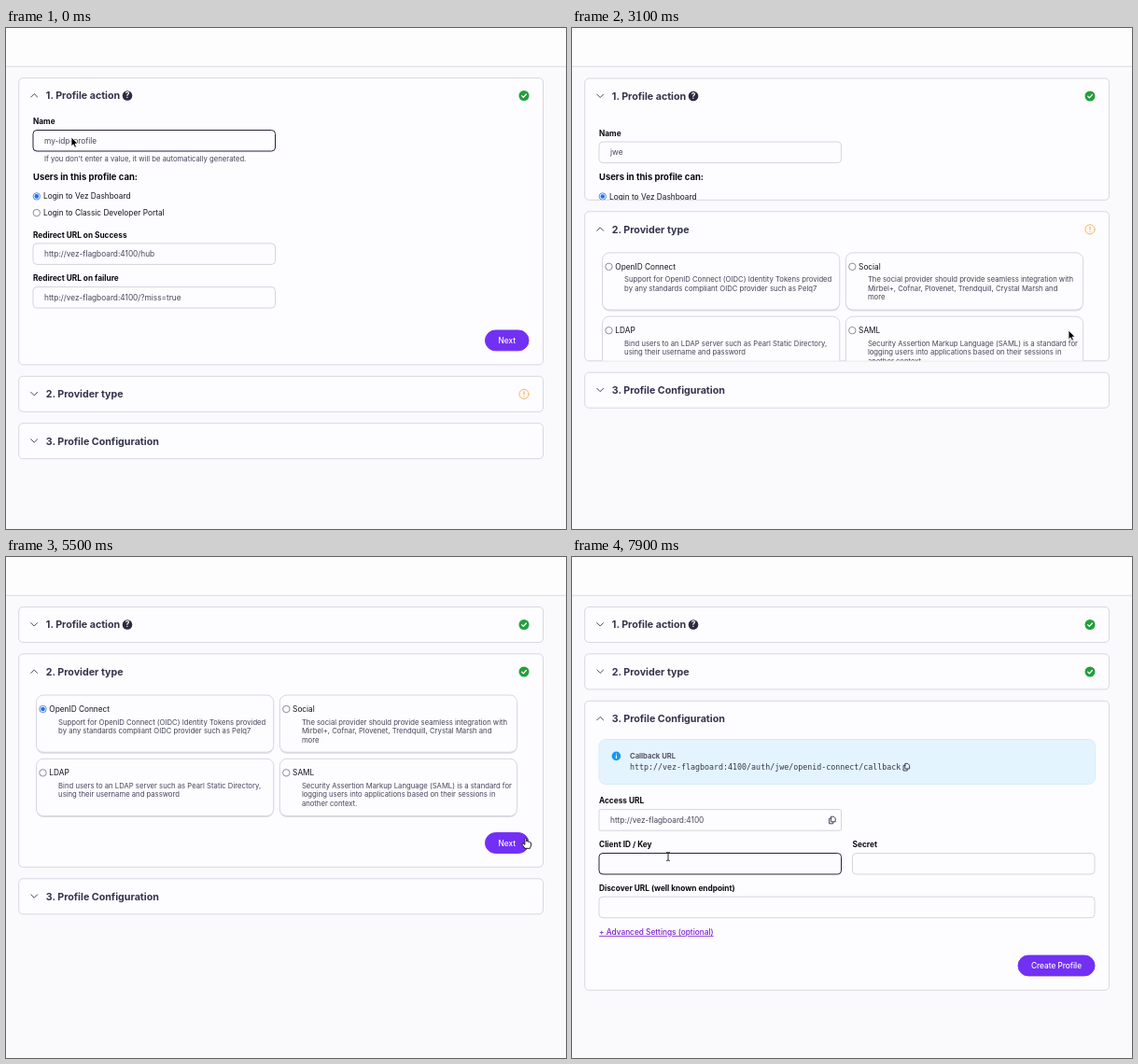
These frames come from a looping animation (600x537 px, 8000 ms). An HTML page:

```html
<!DOCTYPE html>
<html lang="en">
<head>
<meta charset="utf-8">
<title>Profile wizard</title>
<style>
  html, body { margin: 0; width: 100%; height: 100%; overflow: hidden; background: #faf9fc; }
  #stage { display: block; width: 100vw; height: 100vh; }
  text { font-family: Inter, "Liberation Sans", sans-serif; font-size: 8.29px; fill: #15151f; white-space: pre; }
  .title { font-size: 10.68px; font-weight: 650; fill: #34334d; }
  .label { font-weight: 650; fill: #08080f; }
  .lead { font-size: 9.48px; font-weight: 650; fill: #08080f; }
  .value { fill: #474759; }
  .small { font-size: 7.69px; fill: #45455c; }
  .strong { font-weight: 600; }
  .mono { font-family: "DejaVu Sans Mono", monospace; font-size: 8.32px; fill: #34334d; }
  .link { font-weight: 500; fill: #7a1fd6; text-decoration: underline; }
  .button text { font-weight: 500; fill: #fff; text-anchor: middle; }
  .button rect { fill: #7230f5; stroke: #7230f5; }
  .button.off text { fill: #85859a; }
  .button.off rect { fill: #f6f5f9; stroke: #d9d9e1; }
  .input { fill: #fdfcfe; stroke: #d5d5dd; }
  .input.focus { stroke: #25243f; }
  .line { fill: none; stroke: #34334d; stroke-linecap: round; stroke-linejoin: round; }
  .white { stroke: #fff; }
  .ring { fill: #fff; stroke: #70707a; stroke-width: .8; }
  .dot { fill: #2870e8; display: none; }
  .on .ring { stroke: #2870e8; }
  .on .dot { display: inline; }
</style>
</head>
<body>
<svg id="stage" viewBox="0 0 600 537" preserveAspectRatio="none"></svg>
<script>
const LOOP = 8000, HEAD = 38, GAP = 12.4, TOP = 53.5, HINT = 12.4;
const BASES = [TOP, TOP + HEAD + GAP, TOP + 2 * (HEAD + GAP)];
const BODIES = [257, 190.5, 272];
const HOST = 'vez-flagboard:4100';

const named = id => id ? `id="${id}"` : '';
const text = (x, y, s, cls = '', id) => `<text x="${x}" y="${y}" class="${cls}" ${named(id)}>${s}</text>`;
const input = (x, y, w, id, r = 4) =>
  `<rect class="input" ${named(id)} x="${x}" y="${y}" width="${w}" height="22.5" rx="${r}"/>`;
const button = (x, y, w, label, id) =>
  `<g class="button" ${named(id)}><rect x="${x}" y="${y}" width="${w}" height="21.8" rx="10.9"/>` +
  text(x + w / 2, y + 13.9, label) + '</g>';
const radio = (x, y, id, cls = '') =>
  `<g ${named(id)} class="${cls}"><circle class="ring" cx="${x}" cy="${y}" r="3.7"/>` +
  `<circle class="dot" cx="${x}" cy="${y}" r="2.3"/></g>`;
const copyIcon = (x, y) =>
  `<g class="line" stroke-width=".9" transform="translate(${x} ${y})">` +
  '<path d="M-1 -3.8H1.6L3.4 -2V1.8H-1Z"/><path d="M-1 -1.8H-3.2V3.8H1V2"/></g>';
const tick = (y, id) =>
  `<g ${named(id)}><circle cx="555" cy="${y}" r="5.5" fill="#239f3d"/>` +
  `<path d="M552.6 ${y + .1}l1.7 1.7 3.1 -3.3" class="line white" stroke-width="1.2"/></g>`;
const warning = (y, id) =>
  `<g ${named(id)} stroke="#f0b878" stroke-linecap="round"><circle cx="555" cy="${y}" r="5.1" fill="#fff8ee"/>` +
  `<path d="M555 ${y - 2.6}v2.8M555 ${y + 2.4}v.1" stroke-width="1.2"/></g>`;

function card(x, y, name, lines, id) {
  return `<rect x="${x}" y="${y + 1.2}" width="254.3" height="61.5" rx="7.5" fill="#dcdce2"/>` +
    `<rect x="${x}" y="${y}" width="254.3" height="61.2" rx="7.5" fill="#fdfcfe" stroke="#d7d7df"/>` +
    radio(x + 7, y + 15, id) + text(x + 13.8, y + 17.9, name) +
    lines.map((s, i) => text(x + 23.6, y + 31.6 + i * 9.5, s, 'small')).join('');
}

const profileForm =
  text(29, 103, 'Name', 'label') + input(29, 109.5, 259.5, 'nameBox') + text(41, 123.8, '', 'value', 'nameText') +
  text(41, 143.2, "If you don't enter a value, it will be automatically generated.", 'small', 'hint') +
  '<g id="rest">' + text(29, 150.5, 'Users in this profile can:', 'lead') +
  radio(32.8, 168, '', 'on') + text(40, 171, 'Login to Vez Dashboard') +
  radio(32.8, 185.7) + text(40, 188.6, 'Login to Classic Developer Portal') +
  text(29, 212.2, 'Redirect URL on Success', 'label') + input(29, 218.5, 259.5) +
  text(41, 232.8, `http://${HOST}/hub`, 'value') +
  text(29, 259, 'Redirect URL on failure', 'label') + input(29, 265.2, 259.5) +
  text(41, 279.5, `http://${HOST}/?miss=true`, 'value') +
  button(513.5, 311.6, 46.5, 'Next') + '</g>';

const providerForm =
  card(32.5, 148, 'OpenID Connect', ['Support for OpenID Connect (OIDC) Identity Tokens provided',
    'by any standards compliant OIDC provider such as Pelq7'], 'openid') +
  card(293.3, 148, 'Social', ['The social provider should provide seamless integration with',
    'Mirbel+, Cofnar, Plovenet, Trendquill, Crystal Marsh and', 'more']) +
  card(32.5, 216.3, 'LDAP', ['Bind users to an LDAP server such as Pearl Static Directory,',
    'using their username and password']) +
  card(293.3, 216.3, 'SAML', ['Security Assertion Markup Language (SAML) is a standard for',
    'logging users into applications based on their sessions in', 'another context.']) +
  button(513.5, 295.6, 46.5, 'Next', 'providerNext');

const configForm =
  '<rect x="29" y="195.5" width="531.5" height="48" rx="7" fill="#e4f4fe" stroke="#d6ecf9"/>' +
  '<circle cx="47.4" cy="213.4" r="4.8" fill="#1699ee"/>' +
  '<path d="M47.4 213v2.6M47.4 211v.1" class="line white" stroke-width="1.1"/>' +
  text(62, 216.2, 'Callback URL', 'small strong') +
  text(62, 228.1, `http://${HOST}/auth/jwe/openid-connect/callback`, 'mono') + copyIcon(358.2, 225.2) +
  text(29, 264.4, 'Access URL', 'label') + input(29, 270.7, 259.5, '', 1) +
  text(41, 285, `http://${HOST}`, 'value') + copyIcon(278.8, 282) +
  text(29, 311.3, 'Client ID / Key', 'label') + input(29, 317.5, 259.5, 'clientBox') +
  text(300.6, 311.3, 'Secret', 'label') + input(300.5, 317.5, 259.5) +
  text(29, 358, 'Discover URL (well known endpoint)', 'label') + input(29, 364.2, 531) +
  text(29, 404.9, '+ Advanced Settings (optional)', 'link') +
  button(478, 427.1, 82, 'Create Profile');

const heads = [
  '<circle cx="130" cy="72.5" r="5.3" fill="#2c2b40"/>' +
  '<text x="130" y="75.4" text-anchor="middle" style="fill:#fff;font-weight:700">?</text>' + tick(72.5),
  tick(123, 'providerTick') + warning(123, 'providerWarn'),
  ''
];
const titles = ['1. Profile action', '2. Provider type', '3. Profile Configuration'];
const forms = [profileForm, providerForm, configForm];

const panel = i =>
  `<rect id="frame${i}" x="13.7" width="561.8" rx="4.5" fill="#fdfcfe" stroke="#d8d8e0"/>` +
  `<svg id="clip${i}" width="600" overflow="hidden"><g transform="translate(0 ${-BASES[i]})">` +
  `<path id="chevron${i}" class="line" stroke-width=".9"/>` +
  text(42.8, BASES[i] + 22.9, titles[i], 'title') + heads[i] +
  `<g id="body${i}">${forms[i]}</g></g></svg>`;

const stage = document.getElementById('stage');
stage.innerHTML = '<rect width="600" height="537" fill="#faf9fc"/><rect width="600" height="41" fill="#fefdfe"/>' +
  '<path d="M0 41.2H600" stroke="#dadae0"/>' + [0, 1, 2].map(panel).join('') +
  '<g id="arrow"><path d="M0 0V9.8L2.2 7.8L3.7 11.2L5.4 10.4L4 7.1H7Z" fill="#000" stroke="#fff" stroke-width=".8"/></g>' +
  '<g id="hand"><path transform="translate(.4 .9)" ' +
  'd="M-.9 4.6V.4Q0 -.9 .9 .4V3.4Q2.2 2.7 2.8 3.8Q4 3.2 4.4 4.4Q5.8 4.1 5.8 5.6V7.6L4.7 10.9H-.8L-3.7 6.8Q-4.1 5.2 -2.5 5.5L-.9 7Z" ' +
  'fill="#fff" stroke="#111" stroke-width=".9" stroke-linejoin="round"/></g>' +
  '<g id="beam"><path d="M-1.8 -4.6Q0 -4.6 0 -3.6Q0 -4.6 1.8 -4.6M0 -3.6V3.6M-1.8 4.6Q0 4.6 0 3.6Q0 4.6 1.8 4.6" ' +
  'fill="none" stroke="#111" stroke-width=".9"/></g>';

const el = id => document.getElementById(id);
const set = (id, attrs) => { for (const k in attrs) el(id).setAttribute(k, attrs[k]); };
const show = (id, on) => { el(id).style.display = on ? '' : 'none'; };
const mark = (id, cls, on) => el(id).classList.toggle(cls, on);
const clamp = v => Math.min(1, Math.max(0, v));
const smooth = v => v * v * (3 - 2 * v);

// CSS "ease" timing curve, solved by bisection
function ease(x) {
  if (x <= 0 || x >= 1) return clamp(x);
  let lo = 0, hi = 1, u = .5;
  for (let i = 0; i < 20; i++) {
    u = (lo + hi) / 2;
    if (.75 * u * (1 - u) + u ** 3 < x) lo = u; else hi = u;
  }
  return .3 * u * (1 - u) ** 2 + 3 * u * u * (1 - u) + u ** 3;
}

// time, x, y of the pointer tip
const PATH = [
  [0, 70, 117], [1050, 70, 117], [1400, 446, 197], [1900, 534, 320], [2400, 532, 324], [3400, 532, 324],
  [4300, 40, 163], [4950, 40, 163], [5350, 570, 298], [5650, 543, 303], [6450, 542, 303],
  [7300, 103, 321], [LOOP, 103, 321]
];
function pointer(t) {
  const i = PATH.findIndex((p, k) => k && t <= p[0]);
  const [a, b] = [PATH[i - 1], PATH[i]];
  const k = smooth((t - a[0]) / (b[0] - a[0]));
  return [a[1] + (b[1] - a[1]) * k, a[2] + (b[2] - a[2]) * k];
}

const TYPING = [400, 600, 800], FIRST = 3008, SECOND = 5857, SLIDE = 250, PICK = 4800;

function draw(t) {
  const typed = TYPING.filter(k => t >= k).length;
  const first = ease((t - FIRST) / SLIDE), second = ease((t - SECOND) / SLIDE);
  const current = t >= SECOND ? 2 : t >= FIRST ? 1 : 0;
  const hint = typed ? 0 : HINT;
  const picked = t >= PICK;

  el('nameText').textContent = typed ? 'jwe'.slice(0, typed) : 'my-idp-profile';
  show('hint', !typed);
  set('rest', { transform: `translate(0 ${hint})` });
  mark('nameBox', 'focus', t < 2800);
  mark('openid', 'on', picked);
  mark('providerNext', 'off', !picked);
  show('providerTick', picked);
  show('providerWarn', !picked);
  mark('clientBox', 'focus', t >= 7400);

  const open = [1 - first, first - second, second];
  let y = TOP + (t >= 2750 && t < 3400 ? .5 : 0);
  open.forEach((amount, i) => {
    const height = HEAD + (BODIES[i] + (i ? 0 : hint)) * amount;
    const mid = BASES[i] + 18.8, dir = i === current ? -1 : 1;
    set('frame' + i, { y, height });
    set('clip' + i, { y, height });
    set('chevron' + i, { d: `M26.8 ${mid - 1.7 * dir}L30.2 ${mid + 1.7 * dir}L33.6 ${mid - 1.7 * dir}` });
    set('body' + i, { transform: `translate(0 ${i < current ? 12 : 0})` });
    show('body' + i, amount > 0);
    y += height + GAP;
  });

  const [px, py] = pointer(t);
  const onButton = px > 513 && px < 560 &&
    (t < FIRST ? py > 311 && py < 334 : t > PICK && t < 6000 && py > 295 && py < 318);
  const onField = t > 6500 && px > 29 && px < 560 && py > 317.5 && py < 340 && !(px > 288 && px < 301);
  const kind = t > 350 && t < 1050 ? '' : onButton ? 'hand' : onField ? 'beam' : 'arrow';
  for (const id of ['arrow', 'hand', 'beam']) {
    show(id, id === kind);
    set(id, { transform: `translate(${px} ${py})` });
  }
}

const start = performance.now();
function play() {
  draw((performance.now() - start) % LOOP);
  requestAnimationFrame(play);
}
play();
</script>
</body>
</html>
```
